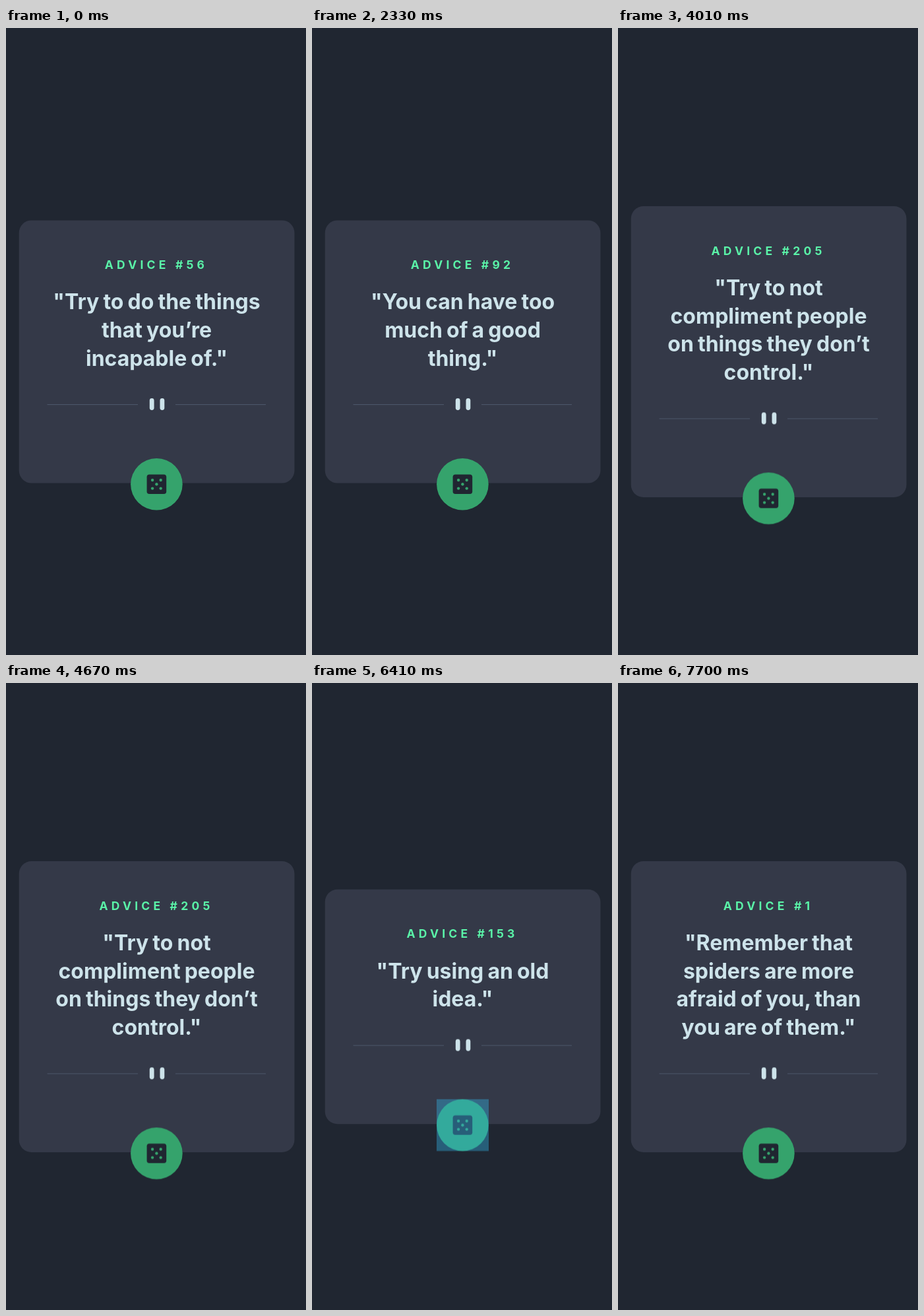
These frames come from a looping animation (455x950 px, 8000 ms). An HTML page:

```html
<!DOCTYPE html>
<html lang="en">
<head>
<meta charset="utf-8">
<title>Advice generator</title>
<style>
  html, body { margin: 0; width: 100%; height: 100%; overflow: hidden; background: #202631; }
  svg { display: block; width: 455px; height: 950px; font-family: Inter, "Open Sans", sans-serif; font-weight: 700; text-anchor: middle; }
  .card { fill: #343948; }
  .title { fill: #5af3a8; font-size: 17.5px; letter-spacing: 5.2px; }
  .quote { fill: #cde3ea; font-size: 32px; word-spacing: -1.5px; }
  .rule { fill: #4c5669; }
  .bar { fill: #cde3ea; }
  .button { fill: #35a36c; }
  .die { fill: #202631; }
  .tap { fill: rgba(51, 181, 229, .4); opacity: 0; }
  .slip { visibility: hidden; }

  .card, .top, .bottom, .tap, .slip { animation: 8s step-end infinite; }
  .card { animation-name: card; }
  .top { animation-name: top; }
  .bottom { animation-name: bottom; }
  .tap { animation-name: tap; }
  .s1 { animation-name: s1; }
  .s2 { animation-name: s2; }
  .s3 { animation-name: s3; }
  .s4 { animation-name: s4; }
  .s5 { animation-name: s5; }

  /* the card grows from its middle with the number of lines */
  @keyframes card {
    0%, 100% { y: 291.4px; height: 398.2px; }
    47.375%, 90.375% { y: 270px; height: 441px; }
    65% { y: 312.8px; height: 355.4px; }
  }
  @keyframes top {
    0%, 100% { transform: translateY(0); }
    47.375%, 90.375% { transform: translateY(-21.4px); }
    65% { transform: translateY(21.4px); }
  }
  @keyframes bottom {
    0%, 100% { transform: translateY(0); }
    47.375%, 90.375% { transform: translateY(21.4px); }
    65% { transform: translateY(-21.4px); }
  }
  @keyframes tap {
    0%, 21.375%, 46.625%, 53.375%, 81.875%, 100% { opacity: 0; }
    18.75%, 44%, 51.75%, 79.25% { opacity: 1; }
    20.5%, 45.75%, 52.5%, 81% { opacity: .5; }
  }
  @keyframes s1 { 0% { visibility: visible; } 22.25%, 100% { visibility: hidden; } }
  @keyframes s2 { 0%, 47.375%, 100% { visibility: hidden; } 22.25% { visibility: visible; } }
  @keyframes s3 { 0%, 65%, 100% { visibility: hidden; } 47.375% { visibility: visible; } }
  @keyframes s4 { 0%, 90.375%, 100% { visibility: hidden; } 65% { visibility: visible; } }
  @keyframes s5 { 0% { visibility: hidden; } 90.375%, 100% { visibility: visible; } }
</style>
</head>
<body>
<svg viewBox="0 0 455 950">
  <rect class="card" x="19.7" y="291.4" width="417.8" height="398.2" rx="19"/>

  <g class="top">
    <g class="slip s1">
      <text class="title" x="228" y="365">ADVICE #56</text>
      <g class="quote">
        <text x="228.5" y="426.3">"Try to do the things</text>
        <text x="228.5" y="469">that you’re</text>
        <text x="228.5" y="511.7">incapable of."</text>
      </g>
    </g>
    <g class="slip s2">
      <text class="title" x="228" y="365">ADVICE #92</text>
      <g class="quote">
        <text x="228.5" y="426.3">"You can have too</text>
        <text x="228.5" y="469">much of a good</text>
        <text x="228.5" y="511.7">thing."</text>
      </g>
    </g>
    <g class="slip s3">
      <text class="title" x="228" y="365">ADVICE #205</text>
      <g class="quote">
        <text x="228.5" y="426.3">"Try to not</text>
        <text x="228.5" y="469">compliment people</text>
        <text x="228.5" y="511.7">on things they don’t</text>
        <text x="228.5" y="554.4">control."</text>
      </g>
    </g>
    <g class="slip s4">
      <text class="title" x="228" y="365">ADVICE #153</text>
      <g class="quote">
        <text x="228.5" y="426.3">"Try using an old</text>
        <text x="228.5" y="469">idea."</text>
      </g>
    </g>
    <g class="slip s5">
      <text class="title" x="228" y="365">ADVICE #1</text>
      <g class="quote">
        <text x="228.5" y="426.3">"Remember that</text>
        <text x="228.5" y="469">spiders are more</text>
        <text x="228.5" y="511.7">afraid of you, than</text>
        <text x="228.5" y="554.4">you are of them."</text>
      </g>
    </g>
  </g>

  <g class="bottom">
    <rect class="rule" x="62.5" y="570" width="137.5" height="1.1"/>
    <rect class="rule" x="257" y="570" width="137" height="1.1"/>
    <rect class="bar" x="217.8" y="561" width="6.8" height="18" rx="3.4"/>
    <rect class="bar" x="233.5" y="561" width="6.8" height="18" rx="3.4"/>
    <circle class="button" cx="228.4" cy="691.2" r="39.3"/>
    <rect class="die" x="213.6" y="676.5" width="29.6" height="29.6" rx="3.8"/>
    <g class="button">
      <circle cx="222.1" cy="685" r="2.2"/>
      <circle cx="234.7" cy="685" r="2.2"/>
      <circle cx="228.4" cy="691.3" r="2.2"/>
      <circle cx="222.1" cy="697.6" r="2.2"/>
      <circle cx="234.7" cy="697.6" r="2.2"/>
    </g>
    <rect class="tap" x="189" y="652" width="79" height="78.5"/>
  </g>
</svg>
</body>
</html>
```
